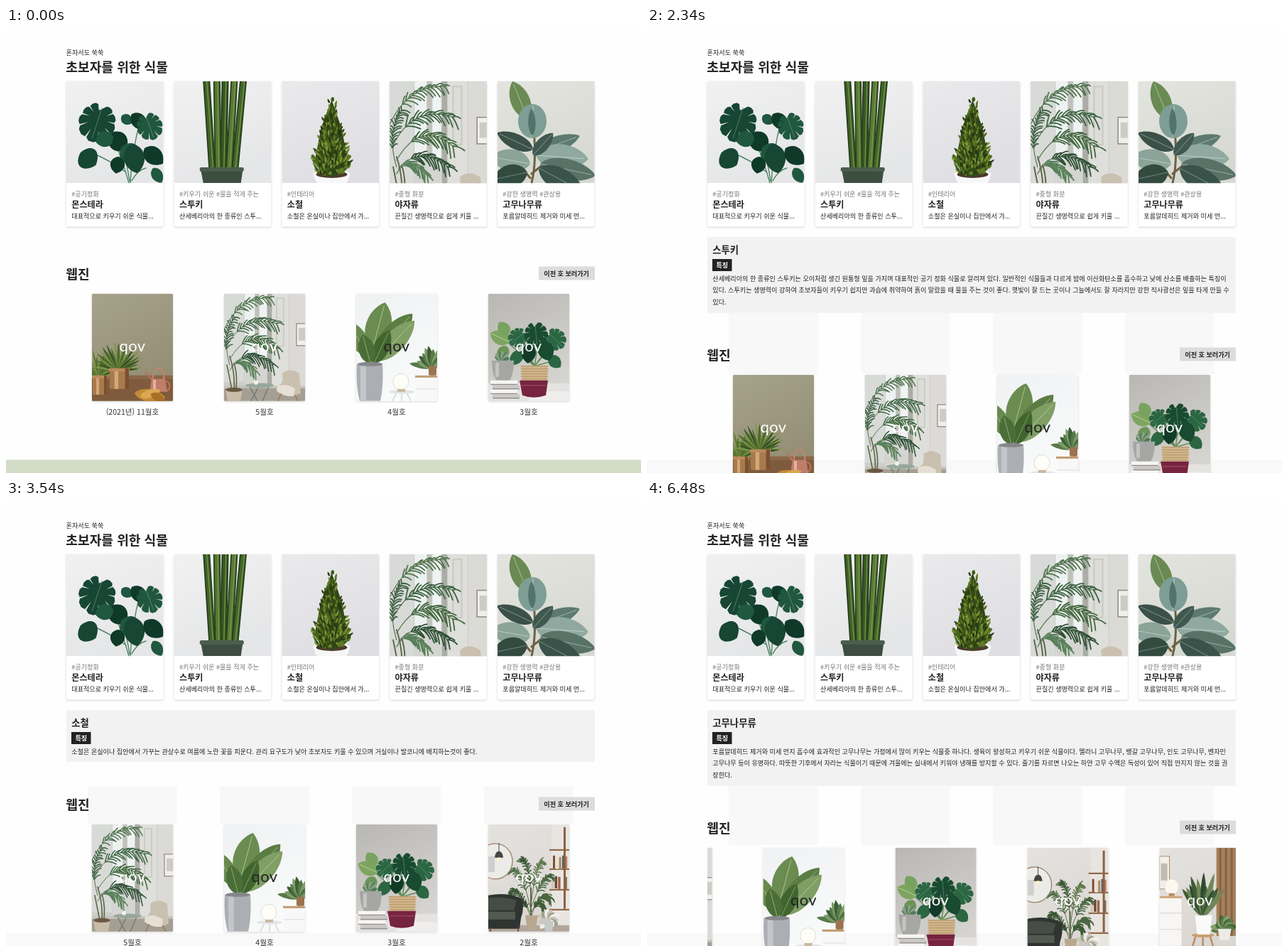
An HTML page that plays this animation: 894x626 px, repeating every 6540 ms.

```html
<!DOCTYPE html>
<html lang="ko">
<head>
<meta charset="utf-8">
<title>식물 웹진</title>
<style>
html, body { margin: 0; width: 100%; height: 100%; overflow: hidden; background: #fefefe; }
svg { display: block; }
text { font-family: "Noto Sans CJK KR", "Noto Sans CJK", "Noto Sans", sans-serif; fill: #222; }
.brand { font-family: Lato, sans-serif; font-size: 22px; letter-spacing: .4px; text-anchor: middle; }
.card { fill: #fff; filter: drop-shadow(0 1.5px 1.5px rgba(0, 0, 0, .17)); }
</style>
</head>
<body>
<svg id="stage" width="894" height="626" viewBox="0 0 894 626"></svg>
<script>
const LOOP = 6540, STEP = 60, PITCH = 186;
const SMALL = 9.08, NAME = 12.1, TITLE = 13.35, HEAD = 18.15;

// drawing helpers
let seed = 7;
const rnd = () => (seed = (seed * 16807) % 2147483647) / 2147483647;
const n = v => v.toFixed(1);
const rect = (x, y, w, h, fill, more = '') => `<rect x="${x}" y="${y}" width="${w}" height="${h}" fill="${fill}" ${more}/>`;
const oval = (x, y, rx, ry, fill, more = '') => `<ellipse cx="${x}" cy="${y}" rx="${rx}" ry="${ry}" fill="${fill}" ${more}/>`;
const shape = (d, fill) => `<path d="${d}" fill="${fill}"/>`;
const line = (d, color, w = 1) => `<path d="${d}" fill="none" stroke="${color}" stroke-width="${w}" stroke-linecap="round"/>`;
const text = (x, y, size, str, weight = 400, more = '') =>
  `<text x="${x}" y="${y}" font-size="${size}" font-weight="${weight}" ${more}>${str}</text>`;
const move = (x, y, body, more = '') => `<g transform="translate(${x} ${y}) ${more}">${body}</g>`;
const shade = (id, a, b) => `<linearGradient id="${id}" x2=".4" y2="1"><stop stop-color="${a}"/><stop offset="1" stop-color="${b}"/></linearGradient>`;

const leaf = (x, y, len, w, deg, fill, vein) => move(x, y,
  shape(`M0 0C${n(len * .15)} ${n(-w * .75)} ${n(len * .75)} ${n(-w * .75)} ${len} 0C${n(len * .75)} ${n(w * .75)} ${n(len * .15)} ${n(w * .75)} 0 0`, fill) +
  (vein ? line(`M0 0H${n(len * .92)}`, vein, .8) : ''), `rotate(${deg})`);

// heart-shaped leaf with thin slits along its rim
function splitLeaf(x, y, r, deg, fill) {
  const pts = [], at = (a, k) => {
    const d = r * k * (.84 + .16 * Math.cos(a) - .08 * Math.sin(a) ** 2);
    pts.push(n(d * Math.cos(a)) + ' ' + n(d * Math.sin(a)));
  };
  for (let k = -4; k <= 4; k++) {
    const a = k * .64;
    at(a - .29, .95); at(a - .1, 1.02); at(a + .12, 1.02); at(a + .27, .94); at(a + .33, .52);
  }
  return move(x, y, shape(`M${pts.join('L')}Z`, fill) + line(`M${n(-r * .5)} 0H${n(r * .85)}`, '#6d9a7c', .6), `rotate(${deg})`);
}

// arched stem with drooping leaflets on both sides
function frond(x, y, cx, cy, ex, ey, len, color) {
  let stem = `M${x} ${y}Q${cx} ${cy} ${ex} ${ey}`, leaves = '';
  for (let t = .3; t <= 1; t += .063) {
    const u = 1 - t;
    const px = u * u * x + 2 * u * t * cx + t * t * ex, py = u * u * y + 2 * u * t * cy + t * t * ey;
    const a = Math.atan2(u * (cy - y) + t * (ey - cy), u * (cx - x) + t * (ex - cx));
    for (const s of [-.55, .65]) {
      const l = len * (1.2 - t * .45) * (.75 + .5 * rnd()), b = a + s + (rnd() - .5) * .3;
      leaves += `M${n(px)} ${n(py)}q${n(l * .5 * Math.cos(b))} ${n(l * .5 * Math.sin(b) - 1)} ${n(l * Math.cos(b))} ${n(l * Math.sin(b) + 4)}`;
    }
  }
  return line(stem, '#5d7350', 1) + line(leaves, color, 1.5);
}

function tuft(x, y, r, count, from, to, colors, w) {
  let s = '';
  for (let i = 0; i < count; i++) {
    const deg = from + (to - from) * i / (count - 1) + rnd() * 8 - 4;
    s += leaf(x, y, n(r * (.65 + .35 * rnd())), w, n(deg), colors[i % colors.length]);
  }
  return s;
}

// plant cards, 137 x 143
function monstera() {
  const g = ['#174634', '#20573f', '#0f3929'];
  return rect(0, 0, 137, 143, 'url(#cool)') +
    line('M46 40Q70 80 88 143M104 55Q92 100 90 143M34 100Q60 110 84 128M76 82Q84 108 89 140M112 122Q100 125 92 140', '#4d8262', 1.4) +
    leaf(78, 48, 18, 13, 40, g[1]) + leaf(92, 46, 30, 18, 45, g[2]) +
    leaf(64, 72, 32, 24, 55, g[2]) + leaf(78, 92, 30, 26, 40, g[1]) +
    splitLeaf(116, 60, 23, 70, g[1]) + splitLeaf(45, 53, 33, 108, g[0]) +
    leaf(20, 100, 28, 28, 40, g[0]) + leaf(66, 78, 26, 20, 165, g[1]) +
    leaf(92, 88, 42, 26, 80, g[0]) + leaf(110, 94, 34, 22, 40, g[2]) + leaf(122, 122, 24, 14, 60, g[1]) +
    leaf(74, 106, 24, 18, 100, g[2]);
}
function spears() {
  let s = rect(0, 0, 137, 143, 'url(#cool)');
  for (const [a, b, c] of [[72, 69, '#385824'], [45, 54, '#3f6128'], [60, 62, '#54772f'], [98, 85, '#42652a'], [85, 77, '#587a35']])
    s += line(`M${a} -8L${b} 130`, '#263d1c', 10) + line(`M${a} -8L${b} 130`, c, 6.5) +
      line(`M${a + 1} 0L${b + 1} 126`, '#7a9a4a', 1.2);
  return s + shape('M37 122H97L94 143H41Z', '#3d4d40') + rect(36, 121, 62, 6, '#4b5d4d', 'rx="2"');
}
function conifer() {
  let s = rect(0, 0, 137, 143, 'url(#lilac)') +
    shape('M44 129H96Q93 143 88 145H52Q47 143 44 129', '#f7f7f8') + oval(70, 130, 25, 6, '#fafafa') + oval(70, 131, 22, 5, '#4c3a2d') +
    shape('M70 26L84 66L92 108Q86 134 70 134Q52 134 47 108L55 66Z', '#34491a');
  for (let i = 0; i < 340; i++) {
    const v = Math.sqrt(rnd()), w = 3 + 22 * Math.min(1, v * 1.25) - Math.max(0, v - .85) * 50;
    const x = 70 + (rnd() * 2 - 1) * w, y = 27 + v * 106;
    s += leaf(n(x), n(y), n(5 + rnd() * 4), 2.4, n(-90 + (x - 70) * 1.8 + rnd() * 40 - 20), ['#5f7a22', '#2d4314', '#7d9338', '#496719', '#243812'][i % 5]);
  }
  return s;
}
const rubber = () => rect(0, 0, 137, 143, 'url(#sage)') +
  line('M48 143Q56 110 50 60M48 130L90 96M46 136L20 105', '#6d6044', 3) +
  leaf(42, 52, 56, 24, -112, '#6a8a53', '#b4c49c') +
  leaf(50, 96, 56, 19, 205, '#3a5048', '#8ca197') + leaf(46, 116, 56, 28, 190, '#8ba399', '#c0cdc5') +
  leaf(42, 128, 50, 28, 168, '#334a41', '#78948a') +
  leaf(52, 100, 68, 20, -20, '#5d7a70', '#aabdb3') + leaf(54, 104, 74, 32, 4, '#8fa9a0', '#c7d4cd') +
  leaf(60, 116, 80, 26, 12, '#587267', '#a3b8ad') + leaf(58, 122, 72, 28, 28, '#39524a', '#839e92') +
  oval(49, 56, 20, 24, '#7e9d95') + line('M48 78L50 34', '#b5c8c0', 1.2) + leaf(49, 76, 38, 9, -92, '#51736a') +
  leaf(50, 104, 42, 16, -48, '#40584f', '#8fa69b');

// magazine covers, 114 x 151
const copper = (x, y, w, h) => rect(x, y, w, h, '#a87a4c', 'rx="2"') + rect(x + w * .25, y, w * .2, h, '#d2a878') +
  rect(x - 1, y, w + 2, 4, '#bd8b5c') + rect(x + w * .8, y, w * .2, h, '#7a5030');
const autumn = () => rect(0, 0, 114, 151, 'url(#olive)') + rect(0, 115, 114, 36, '#7f5b3d') + rect(0, 115, 114, 5, '#8c674a') +
  tuft(10, 118, 42, 24, -165, -15, ['#5f7a34', '#3f5a28', '#7d9347'], 2.4) +
  tuft(37, 108, 42, 30, -175, -5, ['#4d6a2c', '#7b9548', '#364f23'], 2.6) +
  copper(1, 115, 20, 27) + copper(25, 105, 27, 29) +
  line('M76 110L88 126M99 123Q111 121 109 133Q106 139 100 136', '#b9705c', 2.2) +
  line('M86 121Q85 106 94 106Q103 106 101 121', '#c78370', 2) +
  shape('M84 120H103L106 138H81Z', '#c17d69') + rect(86, 121, 4, 16, '#e3b0a0') +
  leaf(60, 140, 44, 15, 8, '#c48a35') + leaf(68, 145, 30, 10, -18, '#daa851') + leaf(83, 141, 22, 10, 25, '#a96f27');
const palm = () => rect(0, 0, 114, 151, '#cdcec9') + rect(0, 0, 28, 124, '#d8dad7') + rect(29, 0, 14, 125, '#edf1f1') +
  rect(44, 0, 5, 130, '#c0c1bb') + rect(50, 0, 10, 125, '#f0f3f3') + rect(61, 0, 6, 130, '#abaca5') +
  rect(68, 0, 23, 132, '#dedfda') + rect(73, 5, 12, 70, '#cbccc6') + rect(75, 7, 8, 66, '#dcddd9') +
  rect(29, 92, 31, 36, '#d4d5d0') + rect(92, 0, 22, 135, '#dcdad6') +
  rect(102, 42, 13, 31, '#f1efeb', 'stroke="#8b887f" stroke-width="1.2"') + rect(105, 48, 9, 18, '#cccbc6') +
  rect(0, 130, 114, 21, '#a59e92') + rect(0, 130, 114, 3, '#c5c2b9') +
  line('M14 140Q16 112 8 88M16 140Q20 116 14 98M12 140Q8 120 4 100', '#5e6547', 1.6) +
  frond(0, 50, 22, 4, 64, 6, 12, '#50754f') + frond(2, 78, 26, 26, 74, 42, 15, '#3c6543') +
  frond(8, 92, 36, 44, 74, 76, 15, '#41683f') + frond(10, 102, 34, 74, 68, 100, 13, '#2f5136') +
  frond(8, 100, -4, 60, 14, 34, 12, '#3c6043') + frond(8, 108, 20, 84, 44, 110, 11, '#58805a') +
  shape('M2 134H26L23 151H5Z', '#c9bca8') + oval(14, 135, 12, 3, '#6a5744') +
  line('M36 130L47 151M49 130L38 151M63 130L54 151', '#6d7d72', 1.4) + oval(50, 129, 20, 3.2, '#96a79b') +
  oval(45, 125, 3, 3, '#f3f1ec') +
  shape('M82 112Q92 103 106 112L108 140Q88 150 74 136L78 128Q84 126 82 112', '#c9c0b0') +
  shape('M75 130Q88 125 100 134L98 144Q84 145 74 137Z', '#e6e0d4') + line('M80 141L76 151M100 143L104 151', '#a07b54', 1.6);
const fiddle = () => rect(0, 0, 114, 151, 'url(#white)') +
  line('M20 100L26 62M22 100L44 66M18 100L8 72', '#668150', 2) +
  leaf(18, 88, 60, 22, -122, '#6a8a4d', '#b0c28d') + leaf(23, 78, 68, 32, -75, '#6a8c50', '#b9ca99') +
  leaf(27, 86, 78, 26, -48, '#5b7d43', '#a8bd86') + leaf(28, 94, 78, 26, -46, '#7f9f65', '#becfa4') +
  leaf(25, 98, 52, 20, -65, '#41652f', '#89a568') + leaf(20, 98, 42, 20, -105, '#4b6e38', '#98b179') +
  shape('M1 99H37Q39 128 34 151H5Q-1 128 1 99', '#abaeb2') + rect(6, 101, 8, 50, '#c3c5c8') + oval(19.5, 99, 17.5, 3, '#85868a') +
  line('M56 141L51 151M64 141V151M72 141L77 151', '#d5d7d8', 1.5) + oval(64, 138, 18, 2.6, '#e2e4e5') +
  oval(63, 124, 11, 11.5, '#fffdf7', 'stroke="#dddcd7"') + rect(58, 134, 11, 4, '#c8b8a0') +
  rect(84, 116, 30, 35, '#f8f8f8') + rect(83, 115, 31, 3, '#c09b70') + line('M84 134H114', '#dcdcdc') +
  tuft(107, 104, 34, 11, -170, -25, ['#587a4a', '#7b9b68', '#3e5f36'], 7) + rect(102, 102, 11, 13, '#9b7350', 'rx="2"');
function basket() {
  const g = ['#194b31', '#2b6642', '#123b27'];
  let weave = '';
  for (let i = 0; i < 6; i++) weave += line(`M46 ${102 + i * 3.6}H84`, '#ab8a5b', .8);
  return rect(0, 0, 114, 151, 'url(#grey)') + rect(0, 126, 114, 25, '#e5e3e1') + oval(96, 151, 40, 14, '#f0eeec') +
    line('M65 102L46 60M65 102L72 56M65 102L95 66M65 102L20 62M65 102L93 94M65 102L52 84M65 102L80 82', '#5d8a54', 1.5) +
    leaf(30, 68, 30, 18, 205, '#7da560', '#bdd3a2') + leaf(28, 58, 22, 15, 235, '#78a35f') + leaf(26, 74, 22, 15, 120, '#6b9457') +
    leaf(86, 88, 22, 15, 45, g[1]) + leaf(48, 80, 26, 15, 130, g[1]) +
    splitLeaf(44, 60, 17, 140, g[1]) + splitLeaf(92, 62, 19, 45, g[1]) + splitLeaf(67, 54, 21, 85, g[0]) +
    leaf(58, 70, 28, 18, 95, g[2]) + leaf(76, 66, 30, 20, 70, g[0]) +
    tuft(20, 95, 16, 7, -150, -30, ['#557a5b', '#86a283'], 5) +
    shape('M5 94H36Q36 114 30 122H11Q5 112 5 94', '#a6a7a5') + rect(10, 97, 5, 20, '#c4c5c3') +
    [0, 1, 2, 3].map(i => rect(3 + i % 2 * 3, 122 + i * 6.5, 38, 5.5, i % 2 ? '#cac8c6' : '#f7f6f5') + rect(3 + i % 2 * 3, 127 + i * 6.5, 38, 1, '#77736f')).join('') +
    shape('M46 101H84L82 124H48Z', '#d1b68c') + weave + shape('M44 122H84L81 143Q64 149 48 143Z', '#76243f') + rect(46, 128, 36, 2, '#93395a');
}
const lounge = () => rect(0, 0, 114, 151, 'url(#warm)') +
  oval(10, 52, 24, 25, '#ebebe8', 'stroke="#9b8066" stroke-width="1.3"') + rect(0, 45, 9, 22, '#cfd0cd') +
  line('M15 27V40', '#4a4744') + shape('M9 47Q10 38 15 38Q20 38 21 47Z', '#464341') + oval(15, 49, 3, 2.5, '#fff1cb') +
  rect(89, 0, 25, 151, '#e8e5e1') + [35, 62, 91, 119].map(y => rect(86, y, 28, 2.2, '#936a49')).join('') +
  [0, 1, 2, 3, 4].map(i => rect(91 + i * 4.3, 44 + i % 3, 3, 18, ['#7e4e38', '#eae0cf', '#a98868', '#566057', '#bd826a'][i]) +
    rect(89 + i * 4.6, 74 - i % 2, 3.4, 17, ['#d7c5ae', '#664739', '#9c634a', '#e9e5dc', '#7c6956'][i])).join('') +
  rect(106, 4, 3, 115, '#8a6144') + rect(0, 142, 114, 9, '#b2a69a') +
  line('M60 132L60 90', '#585a3a', 2) +
  frond(60, 120, 48, 66, 36, 64, 10, '#53704a') + frond(60, 115, 60, 55, 48, 48, 10, '#3c5a36') + frond(60, 115, 66, 60, 75, 52, 10, '#5d7749') +
  frond(60, 118, 76, 72, 88, 72, 10, '#45643d') + frond(60, 125, 40, 86, 34, 95, 9, '#3b5735') + frond(60, 125, 76, 92, 87, 104, 9, '#4a653f') +
  frond(60, 132, 50, 100, 42, 112, 9, '#334b2e') + frond(60, 132, 68, 100, 78, 118, 9, '#3f5a36') +
  shape('M0 100Q25 95 46 104Q52 115 46 132L44 147H0Z', '#2f3430') + shape('M0 104Q22 101 40 107L36 121H0Z', '#454d46') +
  shape('M0 123H38V134H0Z', '#515950') + line('M3 146V151M42 146V151', '#775238', 2) +
  shape('M52 128H70L67 148H55Z', '#b8a890') +
  tuft(85, 134, 18, 14, -180, 160, ['#f1efea', '#cbc7bd', '#9ba389'], 8) + shape('M78 136H92L90 151H80Z', '#c7c9c7');
const studio = () => rect(0, 0, 114, 151, 'url(#warm)') + rect(0, 12, 14, 46, '#f2efeb', 'stroke="#a98b69"') + rect(2, 22, 9, 24, '#c1bcb4') +
  rect(80, 0, 34, 124, '#a5805c') + [0, 1, 2, 3].map(i => rect(84 + i * 8, 0, 3, 124, '#876344')).join('') +
  rect(0, 138, 114, 13, '#c9b398') + rect(0, 70, 31, 68, '#f8f6f4') + rect(0, 68, 32, 3, '#d0a77d') + line('M0 92H31M0 115H31', '#d7d3ce') +
  oval(17, 55, 10, 11, '#fcf8f0', 'stroke="#e2dace"') + rect(13, 64, 8, 4, '#b98c62') +
  tuft(61, 98, 64, 11, -128, -52, ['#3f5c38', '#718656', '#2f4a2f'], 7) +
  line('M51 124L43 150M71 124L79 150M61 124V146', '#b88b60', 2.4) + oval(61, 123, 16, 3, '#cb9e70') +
  shape('M50 95H74L71 122H53Z', '#fafaf8') +
  tuft(91, 113, 20, 13, -190, 10, ['#597b49', '#84a06b', '#42653b'], 8) + shape('M82 114H101L98 130H85Z', '#ecebe7');

const brand = 'qov';
const covers = [
  [autumn, '(2021년) 11월호'], [palm, '5월호'], [fiddle, '4월호', '#222'],
  [basket, '3월호'], [lounge, '2월호'], [studio, '1월호']
];
const plants = [
  ['몬스테라', '#공기정화', '대표적으로 키우기 쉬운 식물...', monstera],
  ['스투키', '#키우기 쉬운 #물을 적게 주는', '산세베리아의 한 종류인 스투...', spears],
  ['소철', '#인테리어', '소철은 온실이나 집안에서 가...', conifer],
  ['야자류', '#중형 화분', '끈질긴 생명력으로 쉽게 키울 ...', () => move(0, 0, palm(), 'scale(1.205)')],
  ['고무나무류', '#강한 생명력 #관상용', '포름알데히드 제거와 미세 먼...', rubber]
];
// start time, panel height, shift of the lower part, ghost bottom, title, lines
const panels = [
  [1200, 90, 97.5, 471, '몬스테라',
    '대표적으로 키우기 쉬운 식물인 몬스테라는 심장 모양의 둥근 잎이 깃털처럼 갈라져있고 군데군데 구멍이 나있는 특징이 있다. 또한 잎에서는 광택이 나고 꽃은 흰 색을 띤다. 여름에 번식하며 관리',
    '요구도가 낮아 초보자가 키우기 좋다. 중간에서 높은 광도를 요구해 거실 창측이나 발코니에 배치하는것이 좋으며 식물체에 독성을 가지고 있어 어린이 주변에 두지 말아야 한다.'],
  [2340, 106.7, 114, 487, '스투키',
    '산세베리아의 한 종류인 스투키는 오이처럼 생긴 원통형 잎을 가지며 대표적인 공기 정화 식물로 알려져 있다. 일반적인 식물들과 다르게 밤에 이산화탄소를 흡수하고 낮에 산소를 배출하는 특징이',
    '있다. 스투키는 생명력이 강하여 초보자들이 키우기 쉽지만 과습에 취약하여 흙이 말랐을 때 물을 주는 것이 좋다. 햇빛이 잘 드는 곳이나 그늘에서도 잘 자라지만 강한 직사광선은 잎을 타게 만들 수',
    '있다.'],
  [3540, 73.3, 81, 454, '소철',
    '소철은 온실이나 집안에서 가꾸는 관상수로 여름에 노란 꽃을 피운다. 관리 요구도가 낮아 초보자도 키울 수 있으며 거실이나 발코니에 배치하는것이 좋다.'],
  [4860, 106.7, 114, 484, '고무나무류',
    '포름알데히드 제거와 미세 먼지 흡수에 효과적인 고무나무는 가정에서 많이 키우는 식물중 하나다. 생육이 왕성하고 키우기 쉬운 식물이다. 멜라니 고무나무, 뱅갈 고무나무, 인도 고무나무, 벤자민',
    '고무나무 등이 유명하다. 따뜻한 기후에서 자라는 식물이기 때문에 겨울에는 실내에서 키워야 냉해를 방지할 수 있다. 줄기를 자르면 나오는 하얀 고무 수액은 독성이 있어 직접 만지지 않는 것을 권',
    '장한다.']
];

const plantCard = ([name, tag, desc, art], i) => move(85 + i * 151.75, 75,
  rect(0, 0, 136.5, 204.5, '#fff', 'class="card" rx="2"') + `<g clip-path="url(#photo)">${art()}</g>` +
  text(7.3, 161.6, SMALL, tag, 400, 'style="fill:#777"') + text(7.3, 178, NAME, name, 700) + text(7.3, 193, SMALL, desc));

const coverCard = ([art, label, ink = '#fff'], i) => move(121 + i * PITCH, 373.8,
  rect(0, 0, 114, 151, '#fff', 'class="card" rx="2"') + `<g clip-path="url(#cover)">${art()}</g>` +
  `<text class="brand" x="57" y="81.5" style="fill:${ink}">${brand}</text>` +
  text(57, 170.4, 10.6, label, 400, 'text-anchor="middle" style="fill:#333"'));

const panel = ([, h, , end, title, ...lines]) => {
  const top = Math.max(294 + h, h < 80 ? 401 : 0);
  let s = rect(0, 608, 894, 18, '#f9f9f9');
  for (let i = 0; i < 4; i++) s += rect(115 + i * PITCH, top, 125.5, end - top, '#f8f8f8');
  return `<g class="panel">${s}${rect(85, 294, 744, h, '#f3f2f3')}` +
    text(92.3, 317.4, TITLE, title, 700) + rect(92, 325, 27.5, 17, '#222') +
    text(97.4, 337, SMALL, '특징', 700, 'style="fill:#fff"') +
    lines.map((l, i) => text(92.3, 356 + i * 16.4, SMALL, l)).join('') + '</g>';
};

const stage = document.getElementById('stage');
stage.innerHTML = '<defs>' +
  shade('cool', '#f1f1f2', '#e5e6e7') + shade('lilac', '#eaeaec', '#dfdfe3') + shade('sage', '#e3e4df', '#d6d9d1') +
  shade('olive', '#a7a38b', '#928d73') + shade('white', '#eff1f3', '#f9fafa') + shade('grey', '#b8b7b3', '#d6d4d0') +
  shade('warm', '#e4e2df', '#dad6d2') +
  '<clipPath id="photo"><rect width="136.5" height="143.3"/></clipPath><clipPath id="cover"><rect width="114" height="151" rx="1.5"/></clipPath>' +
  '<clipPath id="view"><rect x="85" y="365" width="744" height="200"/></clipPath></defs>' +
  text(84.6, 38.4, SMALL, '혼자서도 쑥쑥') + text(84.3, 61.7, HEAD, '초보자를 위한 식물', 700) +
  plants.map(plantCard).join('') + panels.map(panel).join('') +
  '<g id="lower">' + text(84.3, 352.7, HEAD, '웹진', 700) + rect(750, 335.5, 79, 19, '#dcdcdc') +
  text(757.3, 348.6, SMALL, '이전 호 보러가기', 700) +
  `<g clip-path="url(#view)"><g id="track">${covers.map(coverCard).join('')}</g></g>` + rect(0, 607.5, 894, 60, '#d3dcc7') + '</g>';

const panelEls = [...stage.querySelectorAll('.panel')];
const lower = document.getElementById('lower'), track = document.getElementById('track');

// the CSS "ease" curve: cubic-bezier(.25, .1, .25, 1)
function ease(x) {
  if (x <= 0 || x >= 1) return x <= 0 ? 0 : 1;
  let lo = 0, hi = 1;
  for (let i = 0; i < 24; i++) {
    const s = (lo + hi) / 2, u = 1 - s;
    if (.75 * u * u * s + .75 * u * s * s + s * s * s < x) lo = s; else hi = s;
  }
  const u = 1 - lo;
  return .3 * u * u * lo + 3 * u * lo * lo + lo * lo * lo;
}

function draw() {
  const t = Math.floor(performance.now() % LOOP / STEP) * STEP;
  const open = panels.filter(p => t >= p[0]).length - 1;
  panelEls.forEach((el, i) => el.style.display = i === open ? '' : 'none');
  const slid = ease((t - 2925) / 500) + ease((t - 6245) / 500);
  lower.setAttribute('transform', `translate(0 ${open < 0 ? 0 : panels[open][2]})`);
  track.setAttribute('transform', `translate(${n(-PITCH * slid)} 0)`);
  requestAnimationFrame(draw);
}
draw();
</script>
</body>
</html>
```
